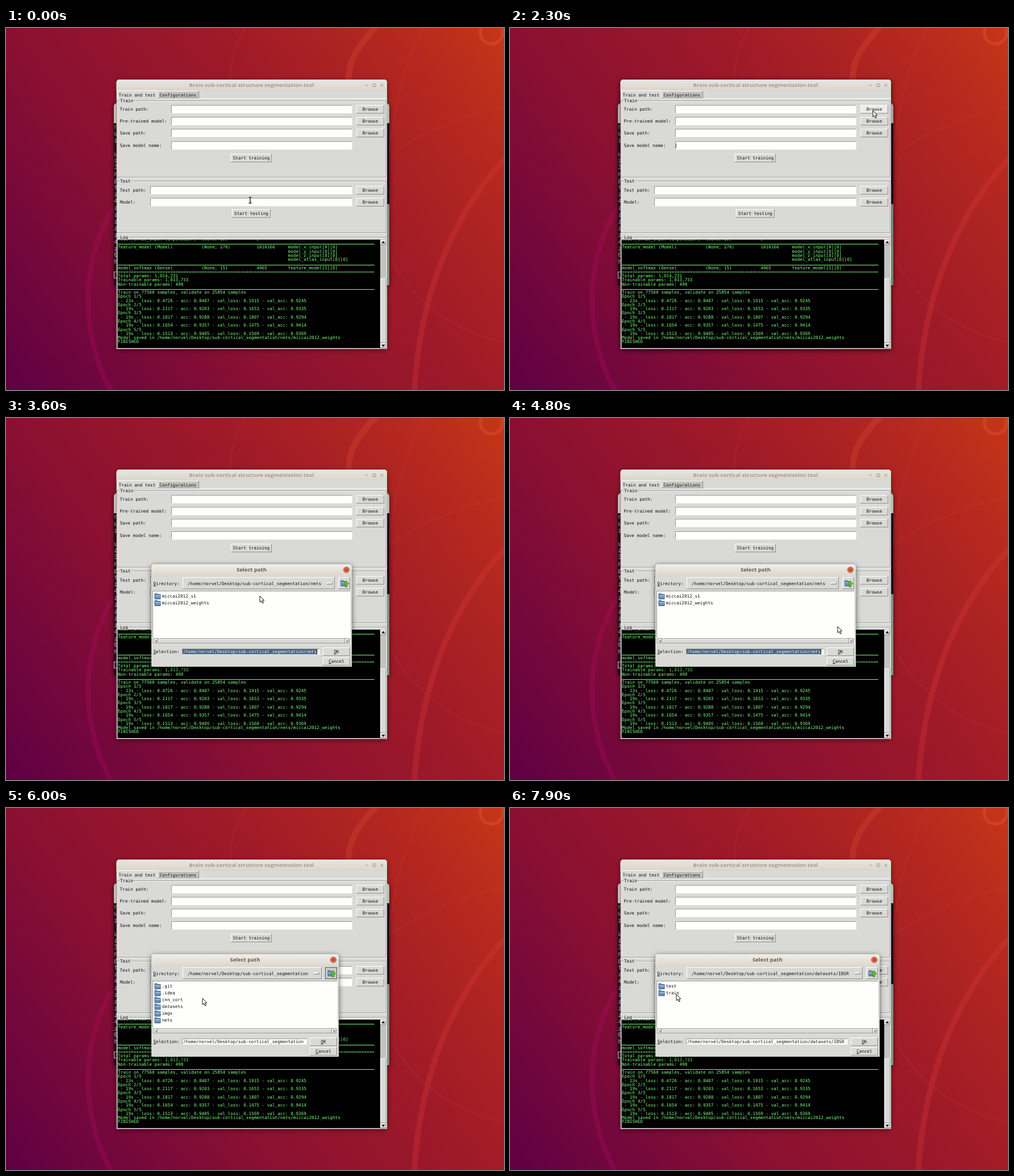
An HTML page with a canvas that plays this animation: 877x639 px, repeating every 8000 ms.

```html
<!DOCTYPE html>
<html lang="en">
<head>
<meta charset="utf-8">
<title>Segmentation tool</title>
<style>
html, body { margin: 0; width: 100%; height: 100%; overflow: hidden; background: #8b1033; }
canvas { display: block; }
</style>
</head>
<body>
<canvas id="stage" width="877" height="639"></canvas>
<script>
const c = document.getElementById('stage').getContext('2d');
const LOOP = 8000, CHAR = 4.61;
const MONO = '7.66px "DejaVu Sans Mono", monospace';
const TITLE = 'bold 9.5px "Open Sans", sans-serif';
const PANEL = '#d9d9d6', WHITE = '#fefefb', SELECT = '#4a6583', GREEN = '#80ff80';
const ROOT = '/home/norvel/Desktop/sub-cortical_segmentation';

function box(x, y, x2, y2, fill) {
  c.fillStyle = fill;
  c.fillRect(x, y, x2 - x, y2 - y);
}
function shape(path, fill, stroke, width = 1) {
  const p = new Path2D(path);
  if (fill) { c.fillStyle = fill; c.fill(p); }
  if (stroke) { c.strokeStyle = stroke; c.lineWidth = width; c.stroke(p); }
}
function text(s, x, middle, color = '#111', font = MONO, align = 'left') {
  c.font = font;
  c.textAlign = align;
  c.fillStyle = color;
  c.fillText(s, x, middle + 2.8);
}
function bevel(x, y, x2, y2, fill, light = '#fff', dark = '#8e8e8a') {
  box(x, y, x2, y2, dark);
  box(x, y, x2 - 1, y2 - 1, light);
  box(x + 1, y + 1, x2 - 1, y2 - 1, fill);
}
const entry = (x, y, x2, y2) => bevel(x, y, x2, y2, WHITE, '#999994', '#eee');
function button(label, x, y, x2, y2, active) {
  bevel(x, y, x2, y2, active ? '#ececea' : PANEL);
  text(label, (x + x2) / 2, (y + y2) / 2, '#111', MONO, 'center');
}
function groove(x, y, x2, y2) {
  c.lineWidth = 1;
  c.strokeStyle = '#fff';
  c.strokeRect(x + 1.5, y + 1.5, x2 - x, y2 - y);
  c.strokeStyle = '#999994';
  c.strokeRect(x + .5, y + .5, x2 - x, y2 - y);
}
function frameLabel(s, y) {
  box(200, y - 4, 202 + s.length * CHAR, y + 5, PANEL);
  text(s, 201, y);
}
function vertical(y, y2, top, bottom) {
  const g = c.createLinearGradient(0, y, 0, y2);
  g.addColorStop(0, top);
  g.addColorStop(1, bottom);
  return g;
}
function windowShape(x, y, x2, y2, fill, shadow) {
  c.save();
  c.shadowColor = `rgba(0,0,0,${shadow})`;
  c.shadowBlur = 10;
  c.shadowOffsetY = 2;
  c.fillStyle = fill;
  c.beginPath();
  c.roundRect(x, y, x2 - x, y2 - y, [5, 5, 0, 0]);
  c.fill();
  c.restore();
}

function wallpaper() {
  const g = c.createLinearGradient(0, 639, 877, 0);
  [[0, '#5f0044'], [.35, '#8a1031'], [.62, '#9f1a28'], [.85, '#b4281f'], [1, '#c53617']]
    .forEach(([at, color]) => g.addColorStop(at, color));
  box(0, 0, 877, 639, g);
  const faint = 'rgba(235,90,70,.13)';
  shape('M198 305C130 400 128 540 186 642', null, 'rgba(190,10,110,.24)', 9);
  shape('M880 229C800 315 730 450 719 642', null, 'rgba(225,60,60,.27)', 10);
  shape('M652 -3C622 30 602 55 603 95', null, 'rgba(225,80,50,.27)', 11);
  shape('M835 8a20 20 0 1 0 40 0a20 20 0 1 0 -40 0', null, 'rgba(225,90,50,.35)', 6);
  shape('M422 0C402 30 395 60 395 92', null, faint, 2);
  shape('M735 0C690 90 668 200 674 300', null, faint, 2);
  shape('M674 400C705 470 780 535 877 555', null, faint, 2);
  shape('M674 225C740 180 800 155 877 140', null, faint, 2);
}

function terminal() {
  windowShape(190, 133, 675, 454, '#2c0a22', .5);
  windowShape(190, 133, 675, 168, '#dcd8d0', 0);
  box(671, 311, 675, 454, '#a7a29d');
  [...'nuz uz3nptz4zzzzz4z0h'].forEach((ch, i) =>
    text(ch, 190.5, 175 + i * 11.93, i ? '#ddd' : '#7ee030', '10px "DejaVu Sans Mono", monospace'));
  c.lineWidth = 1;
  c.strokeStyle = '#ddd';
  c.strokeRect(190.5, 430.5, 6, 11);
}

const layer = (name, dims, params, from) =>
  name.padEnd(32) + dims.padEnd(21) + params.padEnd(12) + from;
const epochs = [
  [23, '0.4726', '0.8407', '0.1915', '0.9245'],
  [19, '0.2117', '0.9203', '0.1653', '0.9335'],
  [19, '0.1817', '0.9288', '0.1807', '0.9294'],
  [19, '0.1654', '0.9357', '0.1475', '0.9414'],
  [19, '0.1513', '0.9405', '0.1569', '0.9369']
].flatMap(([s, loss, acc, vLoss, vAcc], i) => [`Epoch ${i + 1}/5`,
  ` - ${s}s - loss: ${loss} - acc: ${acc} - val_loss: ${vLoss} - val_acc: ${vAcc}`]);
const rule = '_'.repeat(98);
const logLines = [
  layer('model_atlas_input (InputLayer)', '(None, 15)', '0', ''),
  rule,
  layer('feature_model (Model)', '(None, 270)', '1010166', 'model_x_input[0][0]'),
  layer('', '', '', 'model_y_input[0][0]'),
  layer('', '', '', 'model_z_input[0][0]'),
  layer('', '', '', 'model_atlas_input[0][0]'),
  rule,
  layer('model_softmax (Dense)', '(None, 15)', '4065', 'feature_model[1][0]'),
  '='.repeat(98),
  'Total params: 1,014,231',
  'Trainable params: 1,013,733',
  'Non-trainable params: 498',
  rule,
  'Train on 77560 samples, validate on 25854 samples',
  ...epochs,
  `Model saved in ${ROOT}/nets/miccai2012_weights`,
  'FINISHED'
];

function logPanel() {
  bevel(196, 373, 660, 566, '#000', '#888', '#eee');
  c.save();
  c.beginPath();
  c.rect(197, 374, 462, 191);
  c.clip();
  logLines.forEach((line, i) => {
    const y = 372 + i * 7.26;
    if (line === rule) box(197, Math.round(y + 2), 197 + line.length * CHAR, Math.round(y + 3), GREEN);
    else text(line, 197, y, GREEN);
  });
  c.restore();
  box(659, 373, 670, 566, '#c3c3c0');
  bevel(659, 374, 670, 383, PANEL);
  bevel(659, 442, 670, 556, PANEL);
  bevel(659, 556, 670, 565, PANEL);
  shape('M661.5 380h6l-3 -4zM661.5 559h6l-3 4z', '#111');
}

const entries = [[291, 136], [291, 157], [291, 178], [291, 200], [254, 279], [254, 300]];
const fieldNames = ['Train path:', 'Pre-trained model:', 'Save path:', 'Save model name:', 'Test path:', 'Model:'];

function mainWindow(t, pointer) {
  windowShape(194.5, 91, 671, 566.5, PANEL, t >= 2300 && t < 2500 ? .75 : .45);
  windowShape(194.5, 91, 671, 111, vertical(91, 111, '#e9e6e0', '#d9d5cb'), 0);
  text('Brain sub-cortical structure segmentation tool', 432.5, 101, '#a19b93', TITLE, 'center');
  shape('M632.5 101h5M646 98.5h5v5h-5zM659.5 98.5l5 5M664.5 98.5l-5 5', null, '#928d86', .9);

  box(266, 124, 671, 125, '#fff');
  bevel(267, 111, 340, 124, '#c3c3c0');
  bevel(196, 110, 267, 126, PANEL, '#fff', PANEL);
  text('Train and test', 198.5, 118);
  text('Configurations', 270.5, 118);
  groove(195, 128, 669, 263);
  groove(195, 270, 669, 361);
  groove(195, 369, 669, 564);
  frameLabel('Train', 128);
  frameLabel('Test', 270.5);
  frameLabel('Log', 369);

  entries.forEach(([x, y], i) => {
    entry(x, y, 610, y + 15);
    text(fieldNames[i], 200.5, y + 7.3);
    const hover = i === 0 && t < 2400 && pointer[0] >= 617;
    if (i !== 3) button('Browse', 617, y, 666, y + 15, hover);
  });
  if (t >= 2300 && t < 2400) box(292, 204, 293, 212, '#666');
  button('Start training', 396, 222, 468, 237);
  button('Start testing', 398, 320, 466, 335);
  logPanel();
}

function folder(x, y) {
  shape(`M${x} ${y}h4l1 1.5h5v8h-10z`, '#6c8fb8', '#3d5f8c', 1);
  shape(`M${x + 1} ${y + 4}h9`, null, '#a9c4e2', 1.5);
}
function underlined(s, x, y) {
  text(s, x, y);
  box(x, y + 4, x + CHAR, y + 5, '#111');
}

// Each view: start time, directory below the root, its folders, time a row is picked, picked row.
const views = [
  [2500, '/nets', ['miccai2012_v1', 'miccai2012_weights'], Infinity, -1],
  [5300, '', ['.git', '.idea', 'cnn_cort', 'datasets', 'imgs', 'nets'], 6500, 3],
  [6700, '/datasets', ['IBSR'], 7400, 0],
  [7600, '/datasets/IBSR', ['test', 'train'], Infinity, -1]
];

function dialog(t, pointer) {
  const view = views.findLast(v => t >= v[0]);
  if (!view) return;
  const [start, dir, folders, pickTime, picked] = view;
  const path = ROOT + dir;
  const right = Math.round(586 + CHAR * dir.length);
  const [px, py] = pointer;
  const inRow = t >= 2900 && py >= 281 && py < 302;
  const overMenu = inRow && px >= 311 && px < right - 30;
  const overUp = inRow && px >= right - 24 && px < right - 3;
  const stuck = start === 5300;

  c.save();
  if (t < 2600) c.globalAlpha = .6;
  const top = t < 2900 ? 259 : 258;
  windowShape(256, top, right, 439, PANEL, t < 2900 ? .25 : .6);
  windowShape(256, top, right, 279, vertical(258, 279, '#f0ede8', '#dcd7cd'), 0);
  text('Select path', (256 + right) / 2, 268, '#655a52', TITLE, 'center');
  shape(`M${right - 14.5} 268a5 5 0 1 0 10 0a5 5 0 1 0 -10 0`, '#df6647', '#b4533b');
  shape(`M${right - 11.5} 266l4 4m0 -4l-4 4`, null, '#6f2f20');

  underlined('Directory:', 259.5, 292);
  bevel(311, 281, right - 30, 302, overMenu ? '#ececea' : PANEL);
  text(path, 320, 292);
  bevel(right - 44, 290, right - 34, 294, PANEL);
  bevel(right - 24, 281, right - 3, 302, stuck ? '#c9c9c6' : overUp ? '#ececea' : PANEL,
    stuck ? '#555' : '#fff', stuck ? '#555' : '#8e8e8a');
  folder(right - 19, 287);
  shape(`M${right - 12} 298v-5h-3l5 -6l5 6h-3v5z`, '#62bd35', '#37801c', .8);

  bevel(258, 305, right - 2, 389, WHITE, '#999994', '#eee');
  folders.forEach((name, i) => {
    const y = 314 + i * 12;
    const lit = i === picked && t >= pickTime;
    folder(262, y - 4);
    if (lit) box(274, y - 4, 275 + name.length * CHAR, y + 5, SELECT);
    text(name, 274.7, y, lit ? '#fff' : '#111');
  });
  bevel(259, 389, right - 3, 399, '#c3c3c0', '#999994', '#eee');
  bevel(260, 390, 268, 398, PANEL);
  bevel(268, 390, right - 12, 398, PANEL);
  bevel(right - 12, 390, right - 4, 398, PANEL);
  shape(`M265.5 392v4l-3 -2zM${right - 9} 392v4l3 -2z`, '#777');

  underlined('Selection:', 259.5, 412);
  entry(310, 407, right - 56, 418);
  const selected = start === 2500;
  const end = 312 + path.length * CHAR;
  if (selected) box(311, 408, end, 417, SELECT);
  text(path, 312, 412.3, selected ? '#eee' : '#111');
  if (selected && (t - 2600) % 900 < 600) box(end, 408, end + 1, 417, '#111');
  button('OK', right - 51, 405, right - 3, 420);
  button('Cancel', right - 51, 422, right - 3, 437);
  box(right - 27 - CHAR, 416, right - 27, 417, '#111');
  box(right - 27 - 3 * CHAR, 433, right - 27 - 2 * CHAR, 434, '#111');
  c.restore();
}

// Pointer stops: time, x, y.
const stops = [
  [0, 430, 304], [400, 430, 304], [500, 440, 283], [600, 440, 283], [1400, 614, 146],
  [1500, 614, 146], [1900, 639, 146], [2800, 639, 146], [2900, 609, 171], [3100, 609, 171],
  [3600, 447, 314], [4000, 560, 298], [4300, 594, 290], [4400, 594, 290], [4600, 577, 364],
  [4700, 577, 364], [4800, 577, 368], [5200, 594, 288], [5600, 594, 288], [6000, 346, 336],
  [6300, 296, 350], [6500, 292, 344], [6900, 292, 344], [7400, 291, 315], [7700, 291, 315],
  [7900, 293, 329], [8000, 293, 329]
];
function pointerAt(t) {
  const i = stops.findIndex(s => s[0] > t);
  const [t0, x0, y0] = stops[i - 1], [t1, x1, y1] = stops[i];
  const k = (t - t0) / (t1 - t0);
  return [x0 + (x1 - x0) * k, y0 + (y1 - y0) * k];
}
function drawPointer(t, [x, y]) {
  const overEntry = t < 2500 &&
    entries.some(([ex, ey]) => x >= ex && x < 610 && y >= ey && y < ey + 15);
  c.save();
  c.translate(x, y);
  if (overEntry) {
    const beam = 'M-2.5 -5h5M0 -5v10M-2.5 5h5';
    shape(beam, null, '#fff', 3);
    shape(beam, null, '#222', 1.5);
  } else {
    shape('M0 0V11L2.5 8.8L4.4 13L6.3 12.1L4.5 8H7.8Z', '#fff', '#111', 1);
  }
  c.restore();
}

function draw(now) {
  const t = Math.floor(now % LOOP / 100) * 100;
  const pointer = pointerAt(t);
  wallpaper();
  terminal();
  mainWindow(t, pointer);
  dialog(t, pointer);
  drawPointer(t, pointer);
}
const begin = performance.now();
function tick() {
  draw(performance.now() - begin);
  requestAnimationFrame(tick);
}
tick();
</script>
</body>
</html>
```
